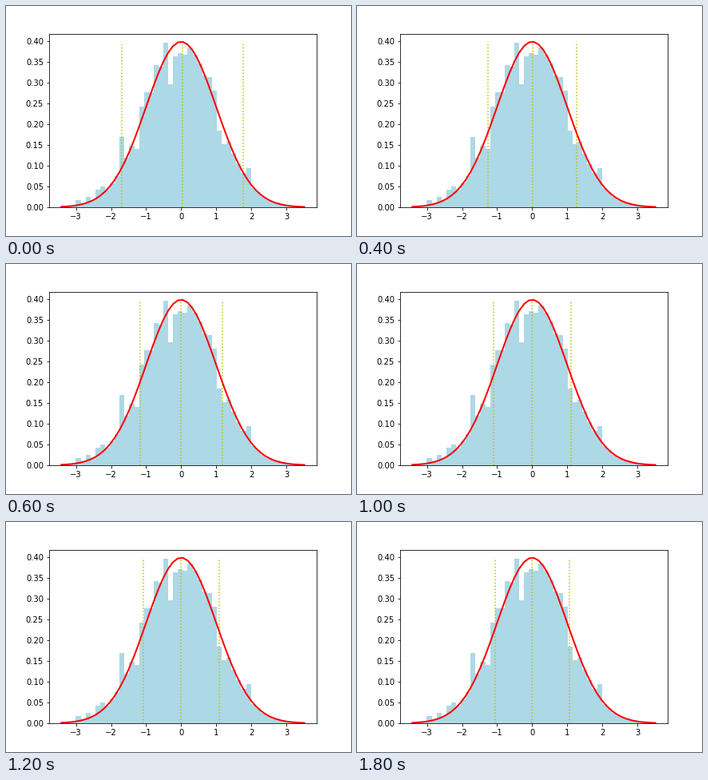
These frames come from a looping animation (432x288 px, 2 s). A matplotlib script:

```python
import numpy as np
import matplotlib.pyplot as plt
from matplotlib.animation import FuncAnimation

plt.rcParams["font.family"] = "DejaVu Sans"
plt.rcParams["font.size"] = 10

LO, HI, BINS, SAMPLES = -3.42, 3.515, 50, 2000
STEPS = 10
DECAY = 0.55

# Where the sample strays from the bell: first bin, number of bins, count
STRAYS = [(3, 1, 4), (5, 1, 4), (7, 2, 5), (12, 1, 20), (15, 1, -10),
          (16, 2, 9), (19, 1, 9), (21, 1, 9), (22, 1, -24), (23, 3, -8),
          (30, 2, 7), (32, 2, -10), (38, 1, 8)]

# Resting pixel of each marker and its starting distance from it
MARKERS = [(172.75, -28.2), (219.2, 1.4), (266.3, 30.3)]


def bell(x):
    return np.exp(-x ** 2 / 2) / np.sqrt(2 * np.pi)


edges = np.linspace(LO, HI, BINS + 1)
width = edges[1] - edges[0]
counts = SAMPLES * width * bell(edges[:-1] + width / 2)
for first, span, lift in STRAYS:
    counts[first:first + span] += lift
density = np.round(counts) / (SAMPLES * width)
curve = bell(edges)
peak = curve.max()

fig = plt.figure(figsize=(6, 4), dpi=72, facecolor="white")
fig.subplots_adjust(left=0.125, right=0.9, bottom=0.125, top=0.88)
ax = fig.add_subplot()

margin = 0.05 * (HI - LO)
ax.set_xlim(LO - margin, HI + margin)
ax.set_ylim(0, 1.05 * peak)
ax.set_xticks(range(-3, 4))
ax.set_yticks(np.arange(9) * 0.05)

ax.bar(edges[:-1], density, width, align="edge", color="lightblue")
lines = [ax.plot([0, 0], [0, peak], "y:", lw=1.5)[0] for _ in MARKERS]
ax.plot(edges, curve, "r", lw=2)


def to_data(px):
    x0, x1 = ax.get_xlim()
    return x0 + (px - 54) / 334.8 * (x1 - x0)


def update(step):
    for line, (rest, gap) in zip(lines, MARKERS):
        x = to_data(rest + gap * DECAY ** step)
        line.set_xdata([x, x])
    return lines


anim = FuncAnimation(fig, update, frames=STEPS, interval=200,
                     repeat=True, repeat_delay=0)
plt.show()
```
